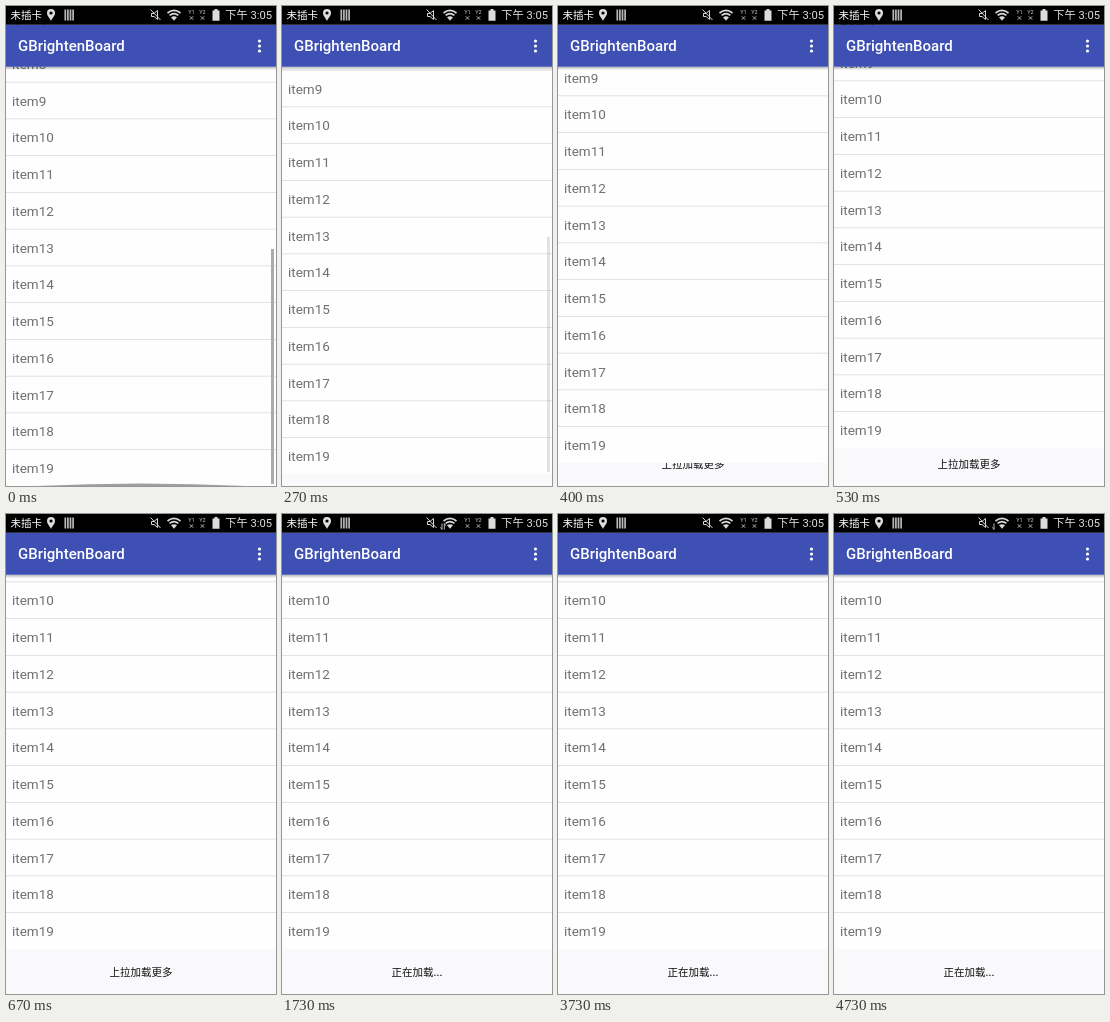
These frames come from a looping animation (270x480 px, 4.87 s). An HTML page:

```html
<!DOCTYPE html>
<html lang="zh-CN">
<head>
<meta charset="utf-8">
<title>Pull up to load</title>
<style>
  html, body { margin: 0; width: 100%; height: 100%; overflow: hidden; background: #000; }
  svg { display: block; width: 270px; height: 480px; }
  text { font-family: Roboto, "Noto Sans CJK SC", "Noto Sans CJK", sans-serif; white-space: pre; }
  .item { font-size: 13.5px; fill: #707070; }
  .hint { font-size: 10.5px; font-weight: 500; fill: #111; text-anchor: middle; }
</style>
</head>
<body>
<svg viewBox="0 0 270 480">
  <defs>
    <linearGradient id="shade" x2="0" y2="1">
      <stop offset="0" stop-color="#000" stop-opacity=".28"/>
      <stop offset="1" stop-color="#000" stop-opacity="0"/>
    </linearGradient>
  </defs>

  <rect width="270" height="480" fill="#f9f8fb"/>
  <text id="hint" class="hint" x="135" y="461.7"></text>

  <g id="list">
    <rect y="-200" width="270" height="680" fill="#fefefe"/>
    <g id="rows"></g>
    <path id="glow" d="M30 480Q135 475 240 480Z" fill="#888"/>
    <rect id="scrollbar" x="265" y="243" width="3" height="235" fill="#ababab"/>
  </g>

  <rect y="60.75" width="270" height="3.5" fill="url(#shade)"/>
  <rect y="18.75" width="270" height="42" fill="#3e50b4"/>
  <text x="12" y="45.4" font-size="15" font-weight="500" fill="#fff">GBrightenBoard</text>
  <g fill="#fff">
    <circle cx="253.5" cy="35" r="1.6"/>
    <circle cx="253.5" cy="40" r="1.6"/>
    <circle cx="253.5" cy="45" r="1.6"/>
  </g>

  <rect width="270" height="18.75" fill="#000"/>
  <text x="4.5" y="13.3" font-size="10.5" font-weight="500" fill="#fff">未插卡</text>
  <path d="M45 15C43.5 11.5 41 10 41 7A4 4 0 0 1 49 7C49 10 46.500 11.500 45 15ZM45 5.400A1.600 1.600 0 0 0 45 8.600A1.600 1.600 0 0 0 45 5.400Z" fill="#ddd" fill-rule="evenodd"/>
  <path d="M59.300 3.500V14.500M61.900 3.500V14.500M64.500 3.500V14.500M67.100 3.500V14.500" stroke="#b8b8b8" stroke-width="1.700"/>

  <g fill="none" stroke="#d8d8d8">
    <path d="M145.500 7.500H148L151.500 4.500V13.500L148 10.500H145.500Z"/>
    <path d="M144.500 3.500L154.500 14"/>
    <path d="M161.500 7Q168 1.800 174.500 7M163.600 9.400Q168 6 172.400 9.400" stroke-width="1.700"/>
  </g>
  <path d="M165 11.300Q168 9.300 171 11.300L168 14.700Z" fill="#d8d8d8"/>
  <g stroke="#c8c8c8" stroke-width=".9" fill="none">
    <path d="M183.800 10.300L187.200 13.700M187.200 10.300L183.800 13.700M194.800 10.300L198.200 13.700M198.200 10.300L194.800 13.700"/>
  </g>
  <g font-size="5.500" fill="#ccc" text-anchor="middle">
    <text x="185.500" y="7.700">Y1</text>
    <text x="196.500" y="7.700">Y2</text>
  </g>
  <path d="M206.500 4.500H208.500V3H211.500V4.500H213.500V14.800H206.500Z" fill="#dcdcdc"/>
  <text x="266" y="13.400" font-size="11.200" fill="#ddd" text-anchor="end">下午 3:05</text>
  <g fill="none" stroke="#ccc" stroke-width=".9">
    <path id="down" d="M160 9.500V15.500L158.300 13.300"/>
    <path id="up" d="M162.300 15.500V9.500L163.800 11.700"/>
  </g>
</svg>

<script>
const LOOP = 4870;
const PITCH = 36.75;
const LIST_BOTTOM = 480;
// Upward drag distance at each pose, about 15 poses per second
const DRAG = [0, 2, 4.5, 8, 12, 16.5, 23, 31, 38, 43, 45];

const $ = id => document.getElementById(id);
const [hint, list, rows, glow, scrollbar, down, up] =
  ['hint', 'list', 'rows', 'glow', 'scrollbar', 'down', 'up'].map($);

function add(tag, attrs, content = '') {
  const node = document.createElementNS('http://www.w3.org/2000/svg', tag);
  for (const key in attrs) node.setAttribute(key, attrs[key]);
  node.textContent = content;
  rows.append(node);
}

for (let i = 7; i < 20; i++) {
  const top = LIST_BOTTOM - 36 - (19 - i) * PITCH;
  add('rect', { y: top - 0.75, width: 270, height: 0.75, fill: '#d8d8d8' });
  add('text', { x: 6, y: top + 23.2, class: 'item' }, 'item' + i);
}

const poseStart = n => Math.round(n * 20 / 3) * 10;

function poseAt(t) {
  let n = 0;
  while (n < DRAG.length - 1 && poseStart(n + 1) <= t) n++;
  return n;
}

const fade = (node, alpha) => node.setAttribute('opacity', Math.max(0, alpha));

function render(t) {
  const pose = poseAt(t);
  list.setAttribute('transform', `translate(0 ${-DRAG[pose]})`);
  fade(scrollbar, 1 - pose * 0.165);
  fade(glow, 0.8 - pose * 0.27);

  const label = t < 1130 ? '上拉加载更多' : '正在加载...';
  if (hint.textContent !== label) hint.textContent = label;

  const receiving = t >= 1730 && t < 3730;
  fade(up, receiving ? 1 : 0);
  fade(down, receiving ? (t < 2730 ? 1 : 0.4) : t >= 4730 ? 1 : 0);
}

const start = performance.now();
function tick() {
  render((performance.now() - start) % LOOP);
  requestAnimationFrame(tick);
}
tick();
</script>
</body>
</html>
```
